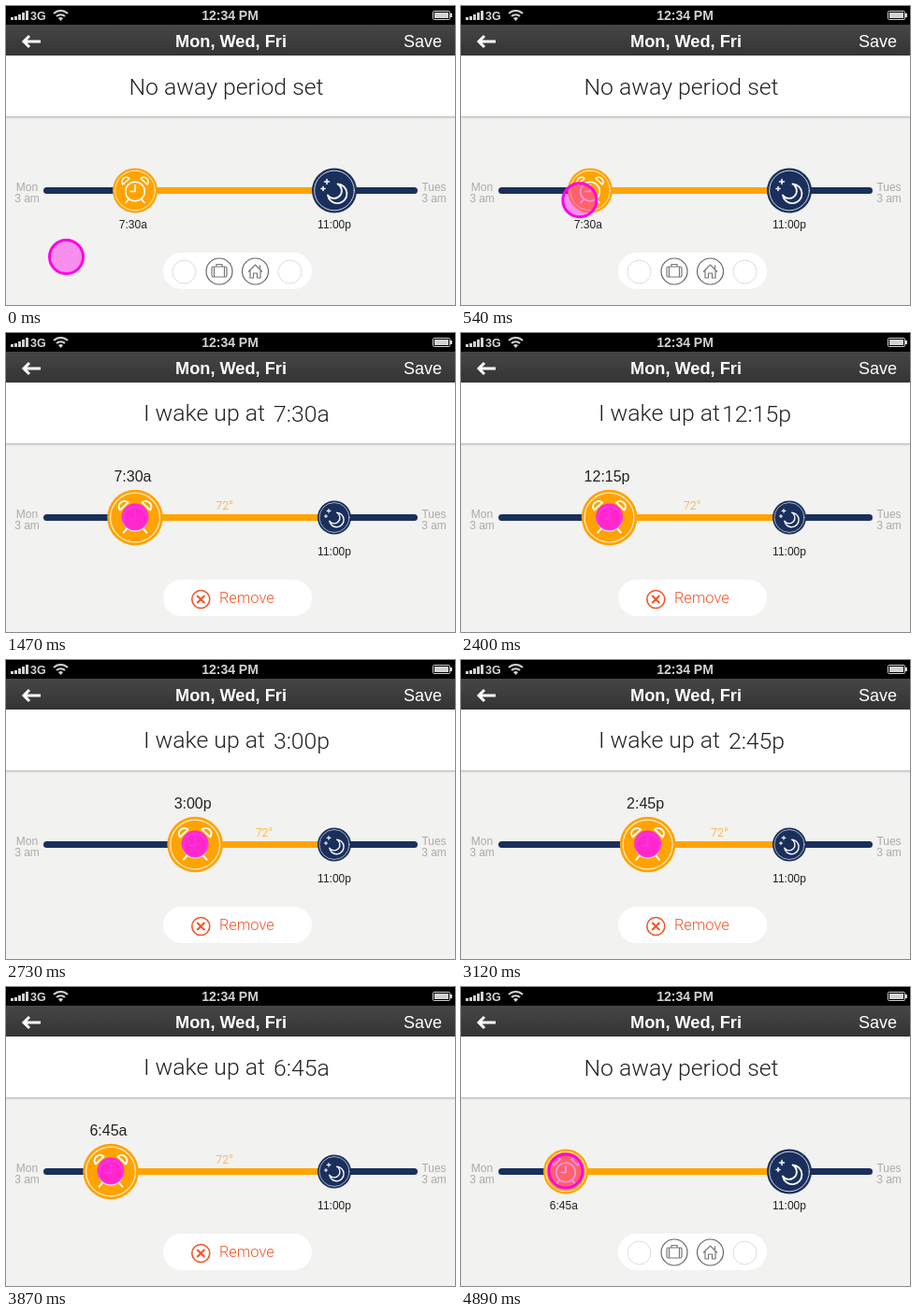
These frames come from a looping animation (480 by 320 pixels, 5.22 s). An HTML page:

```html
<!DOCTYPE html>
<html lang="en">
<head>
<meta charset="utf-8">
<title>Schedule slider</title>
<style>
  html, body { margin: 0; width: 100%; height: 100%; overflow: hidden; background: #f2f2f1; }
  svg { display: block; width: 480px; height: 320px; }
  text { font-family: "Liberation Sans", Arial, sans-serif; font-size: 12px; fill: #222; }
  .mid { text-anchor: middle; }
  .bold { font-weight: bold; }
  .light { font-family: Roboto, "Liberation Sans", sans-serif; font-weight: 300; }
  .big { font-size: 24.8px; }
  .side { fill: #aaa; }
  .line { fill: none; stroke: #fff; stroke-linecap: round; stroke-linejoin: round; }
</style>
</head>
<body>
<svg viewBox="0 0 480 320">
  <defs>
    <linearGradient id="bar" x2="0" y2="1">
      <stop stop-color="#464646"/><stop offset="1" stop-color="#343434"/>
    </linearGradient>
    <linearGradient id="shade" x2="0" y2="1">
      <stop stop-color="#bcbcbc"/><stop offset="1" stop-color="#f2f2f1"/>
    </linearGradient>
  </defs>

  <rect width="480" height="320" fill="#f2f2f1"/>
  <rect y="118" width="480" height="3" fill="url(#shade)"/>
  <rect y="53" width="480" height="65" fill="#fff"/>

  <!-- status bar -->
  <rect width="480" height="20"/>
  <g fill="#d2d2d2">
    <path d="M5 12h3v3h-3zM9 11h3v4h-3zM13 9h3v6h-3zM17 7h3v8h-3zM21 5h3v10h-3z"/>
    <text x="26" y="15" class="bold" style="font-size:12.5px;fill:#d2d2d2">3G</text>
    <text x="239.500" y="15" class="mid bold" style="font-size:14px;fill:#d2d2d2">12:34 PM</text>
    <path d="M58.500 16l-2.600-3a4 4 0 0 1 5.200 0z"/>
    <path d="M54 11a6.500 6.500 0 0 1 9 0M51 8a10.700 10.700 0 0 1 15 0" fill="none" stroke="#d2d2d2" stroke-width="2"/>
    <rect x="456.500" y="5.500" width="18" height="9" rx="1" fill="none" stroke="#d2d2d2"/>
    <path d="M458 7h15v6h-15zM475 8h2v4h-2z"/>
  </g>

  <!-- navigation bar -->
  <rect y="20" width="480" height="33" fill="url(#bar)"/>
  <path class="line" d="M37 38H19M25 32l-6 6 6 6" stroke-width="3" style="stroke-linecap:butt;stroke-linejoin:miter"/>
  <text x="240.500" y="44" class="mid bold" style="font-size:18.200px;fill:#fff">Mon, Wed, Fri</text>
  <text x="445.500" y="44" class="mid" style="font-size:18px;fill:#fff">Save</text>

  <!-- headline -->
  <text x="235.500" y="94.500" class="mid light big idle">No away period set</text>
  <g class="active">
    <text x="212" y="94" class="mid light big">I wake up at</text>
    <text x="316" y="95" class="mid light big time"></text>
  </g>

  <!-- timeline -->
  <g class="mid">
    <text x="22.500" y="198" class="side">Mon</text>
    <text x="22.500" y="210" class="side">3 am</text>
    <text x="457.500" y="198" class="side">Tues</text>
    <text x="457.500" y="210" class="side">3 am</text>
    <text x="351" y="238">11:00p</text>
  </g>
  <path d="M43.500 197.500H436.500" stroke="#1a2f5c" stroke-width="7" stroke-linecap="round"/>
  <path id="span" stroke="#ffa300" stroke-width="7"/>
  <text id="temp" y="189" class="mid light active" style="font-size:12.500px;fill:#ffa300">72°</text>

  <g id="moon">
    <circle r="24" fill="#1a2f5c"/>
    <circle r="21.300" class="line" opacity=".8"/>
    <path class="line" stroke-width="1.800" d="M3.500-7A10.300 10.300 0 1 1-7 5A8.200 8.200 0 1 0 3.500-7z"/>
    <path class="line" stroke-width="1.500" d="M-8-12v5M-10.500-9.500h5M-12-4v4M-14-2h4"/>
  </g>

  <g id="clock">
    <circle r="24" fill="#ffa300"/>
    <circle r="21.300" class="line" opacity=".8"/>
    <g class="line" stroke-width="1.600">
      <circle cy="1" r="10.300"/>
      <path d="M0-6V1H-5M-7 9.500L-10 13M7 9.500L10 13"/>
      <path d="M-13-6.500A4.800 4.800 0 0 1-6-13zM13-6.500A4.800 4.800 0 0 0 6-13z"/>
    </g>
  </g>
  <text id="below" y="238" class="mid idle time"></text>
  <text id="above" y="159" class="mid active time" style="font-size:16px"></text>

  <!-- bottom pill -->
  <rect x="168" y="264" width="159" height="39" rx="19.500" fill="#fff"/>
  <g class="idle" fill="none" stroke="#666" stroke-width="1.200">
    <circle cx="190.500" cy="284.500" r="12.500" stroke="#ddd" stroke-width="1"/>
    <circle cx="303.500" cy="284.500" r="12.500" stroke="#ddd" stroke-width="1"/>
    <circle cx="228" cy="284" r="14"/>
    <circle cx="266.500" cy="284" r="14"/>
    <g stroke="#777">
      <rect x="220" y="279" width="16" height="11" rx="1.500"/>
      <path d="M225 279v-2.500h6v2.500M222.500 279v11M233.500 279v11"/>
      <path d="M259 284.500l7.500-7.500 7.500 7.500M261 283v8h3.500v-5h4v5h3.500v-8M271.500 281v-3.500"/>
    </g>
  </g>
  <g class="active">
    <g fill="none" stroke="#f2562a" stroke-width="1.600">
      <circle cx="208.300" cy="285" r="9.500"/>
      <path d="M204.300 281l8 8M212.300 281l-8 8" stroke-width="2.200"/>
    </g>
    <text x="257.300" y="289" class="mid light" style="font-size:16.400px;fill:#f2562a">Remove</text>
  </g>

  <!-- finger -->
  <circle id="touch" fill="#ff14e6" stroke="#ff00e6"/>
</svg>
<script>
const LOOP = 5220, STEP = 30;
const $ = id => document.getElementById(id);
const all = c => document.querySelectorAll(c);
const set = (el, attrs) => { for (const k in attrs) el.setAttribute(k, attrs[k]); };
const mix = (a, b, p) => a + (b - a) * p;
const part = (t, a, b) => Math.min(1, Math.max(0, (t - a) / (b - a)));
const smooth = p => p * p * (3 - 2 * p);
const quad = p => p < .5 ? 2 * p * p : 1 - 2 * (1 - p) ** 2;

// knob position -> hour of day
const HOURS = [[112, 6.75], [138, 7.5], [158.5, 12.25], [200, 14.75], [212, 15.5]];
function timeAt(x) {
  let i = 1;
  while (i < HOURS.length - 1 && x > HOURS[i][0]) i++;
  const [x0, h0] = HOURS[i - 1], [x1, h1] = HOURS[i];
  const q = Math.round(mix(h0, h1, part(x, x0, x1)) * 4);
  const h = q >> 2, m = q % 4 * 15;
  return (h % 12 || 12) + ":" + String(m).padStart(2, "0") + (h < 12 ? "a" : "p");
}

function draw(t) {
  const reach = quad(part(t, 0, 745));
  const press = smooth(part(t, 1140, 1470)) - smooth(part(t, 4620, 4890));
  const out = smooth(part(t, 2130, 2908)), back = smooth(part(t, 2908, 3870));
  const x = 138 + 74 * out - 100 * back;

  set($("span"), { d: `M${x} 197.5H351` });
  set($("clock"), { transform: `translate(${x} 197.5) scale(${mix(1, 1.24, press)})` });
  set($("moon"), { transform: `translate(351 197.5) scale(${mix(1, .75, press)})` });
  set($("temp"), { x: 233.5 + 49 * (out - back) });
  set($("below"), { x: x - 2.2 });
  set($("above"), { x: x - 2.5 });
  set($("touch"), {
    cx: mix(64.5, x, reach), cy: mix(268.5, 197, reach),
    r: mix(18, 14.4, press), "stroke-width": mix(3, 0, press),
    "fill-opacity": mix(.45, .88, press)
  });
  all(".time").forEach(el => el.textContent = timeAt(x));
  all(".idle").forEach(el => set(el, { opacity: 1 - press }));
  all(".active").forEach(el => set(el, { opacity: press }));
}

const start = performance.now();
function tick() {
  const t = (performance.now() - start) % LOOP;
  draw(Math.floor(t / STEP) * STEP);
  requestAnimationFrame(tick);
}
tick();
</script>
</body>
</html>
```
